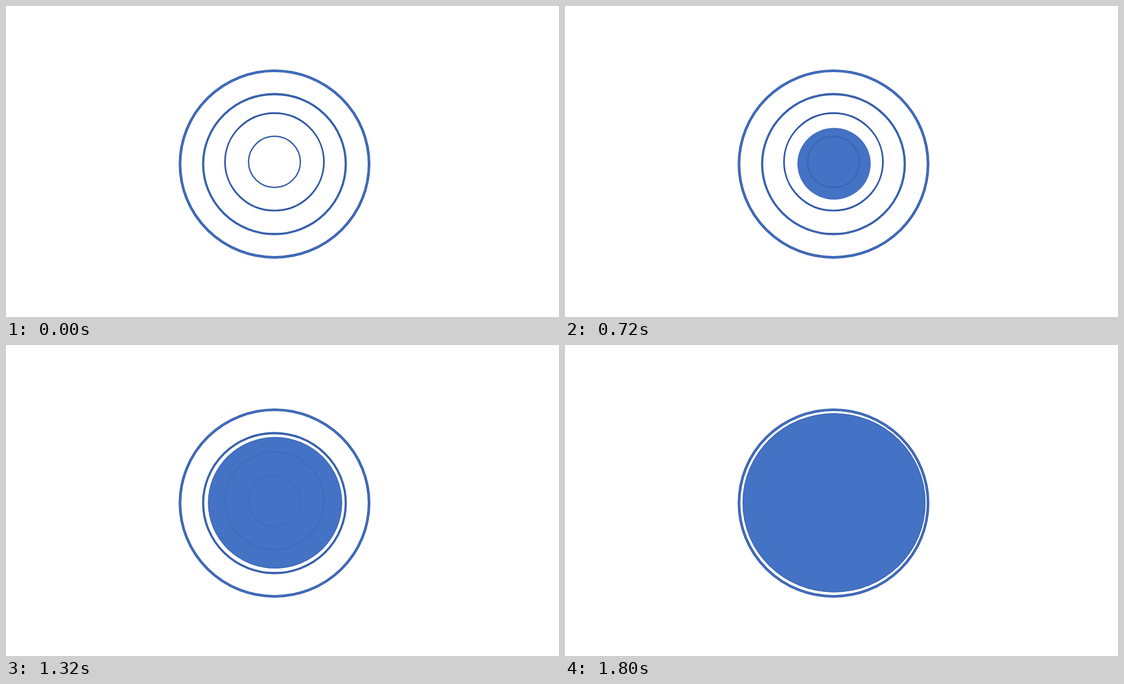
An HTML page with a canvas that plays this animation: 853 px wide and 480 px high, repeating every 1860 ms.

```html
<!DOCTYPE html>
<html lang="en">
<head>
<meta charset="utf-8">
<title>Growing disc</title>
<style>
  html, body { margin: 0; width: 100%; height: 100%; overflow: hidden; background: #fff; }
  canvas { display: block; }
</style>
</head>
<body>
<canvas id="stage" width="853" height="480"></canvas>
<script>
const ctx = document.getElementById('stage').getContext('2d');
const LOOP = 1860, STEP = 60;
const BLUE = '#4472c4', DARK = '#2f57a3';

// centre, radii, line width, width of the lighter core
const rings = [
  { x: 414.2, y: 244, rx: 145.8, ry: 144, w: 4, core: 1.8 },
  { x: 414.1, y: 244, rx: 110, ry: 108, w: 3.3, core: 0.8 },
  { x: 414.1, y: 240.6, rx: 76.3, ry: 75.2, w: 2.6, core: 0 },
  { x: 414.1, y: 240.6, rx: 40, ry: 39.5, w: 2, core: 0 }
];

function oval(x, y, rx, ry) {
  ctx.beginPath();
  ctx.ellipse(x, y, rx, ry, 0, 0, Math.PI * 2);
}

function line(width, color) {
  ctx.lineWidth = width;
  ctx.strokeStyle = color;
  ctx.stroke();
}

function drawRings() {
  for (const r of rings) {
    oval(r.x, r.y, r.rx, r.ry);
    line(r.w, DARK);
    if (r.core) line(r.core, BLUE);
  }
}

function drawDisc(t) {
  const rx = 0.0784 * t, ry = 0.0768 * t;
  ctx.save();
  oval(415, 243.5, rx, ry);
  ctx.fillStyle = BLUE;
  ctx.fill();
  ctx.clip();
  // the disc's rim darkens as it grows
  ctx.globalAlpha = 0.7 * t / 1800;
  line(2, DARK);
  // covered rings shine through and fade away
  ctx.globalAlpha = 0.4 * (1800 - t) / 900;
  drawRings();
  ctx.restore();
}

function draw(now) {
  const t = Math.floor((now % LOOP) / STEP) * STEP;
  ctx.fillStyle = '#fff';
  ctx.fillRect(0, 0, 853, 480);
  drawRings();
  if (t >= 120) drawDisc(t);
}

let start;
function tick(now) {
  if (start === undefined) start = now;
  draw(now - start);
  requestAnimationFrame(tick);
}
draw(0);
requestAnimationFrame(tick);
</script>
</body>
</html>
```
